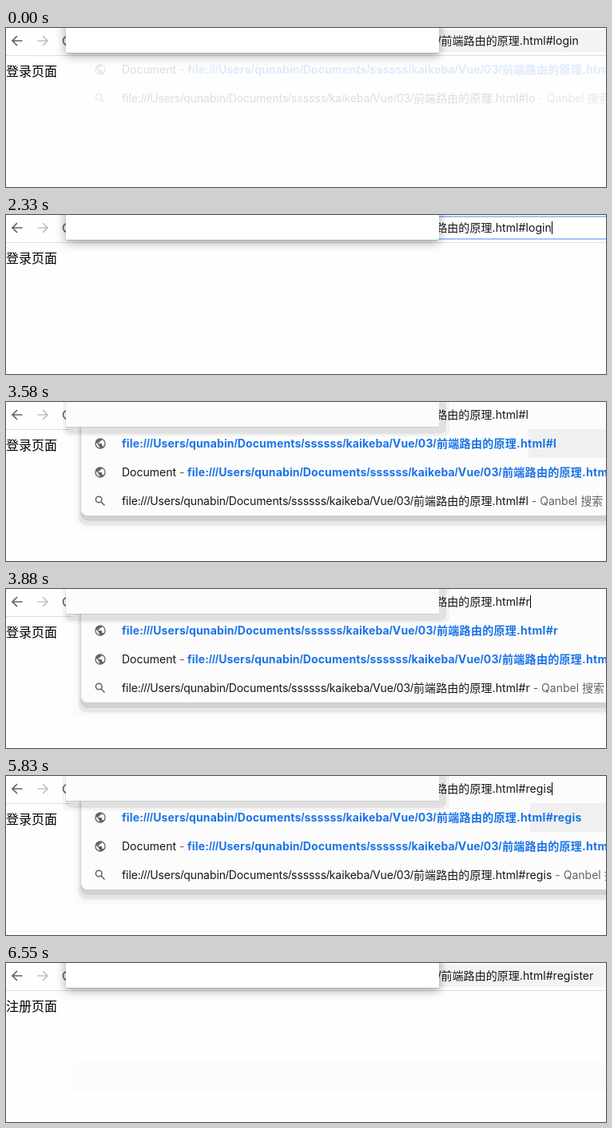
Write an HTML page with a canvas that moves like this. It is 751 by 199 pixels and loops after 8.18 s.

```html
<!DOCTYPE html>
<html lang="zh">
<head>
<meta charset="utf-8">
<title>前端路由的原理</title>
<style>
  html, body { margin: 0; width: 100%; height: 100%; overflow: hidden; background: #fefefe; }
  canvas { display: block; }
</style>
</head>
<body>
<canvas id="stage" width="751" height="199"></canvas>
<script>
const ctx = document.getElementById('stage').getContext('2d');
const LOOP = 8180;
const INK = '#151618', GRAY = '#5f6368', BLUE = '#1a73e8';
const FOLDER = 'file:///Users/qunabin/Documents/ssssss/kaikeba/Vue/03/';
const PAGE = '前端路由的原理.html#';
const ENGINE = 'Qanbel';
const GLOBE = new Path2D(`M12 2a10 10 0 1 0 0 20a10 10 0 1 0 0 -20z
  M11 19.9C7 19.4 4 16 4 12q0 -.9 .2 -1.8L9 15v1q0 2 2 2z
  M17.9 17.4Q17.4 16 16 16h-1v-3q0 -1 -1 -1H8v-2h2q1 0 1 -1V7h2q2 0 2 -2v-.4C18 5.8 20 8.7 20 12q0 3 -2.1 5.4z`);

// Each state holds from its time on and inherits what it does not set.
const steps = [
  { at: 0, hash: 'login', page: '登录页面', mode: 'rest', popup: 0.14 },
  { at: 50, popup: 0 },
  { at: 1610, mode: 'focus', ring: '#aecdfa', caret: true },
  { at: 1670, ring: '#a0c6fa' },
  { at: 2330, mode: 'edit' },
  { at: 2690, hash: 'logi', ring: null, popup: 0.5 },
  { at: 2750, popup: 1 },
  { at: 2810, hash: 'log' },
  { at: 2930, hash: 'lo' },
  { at: 3100, hash: 'l', highlight: 654 },
  { at: 3580, caret: false },
  { at: 3640, hash: '', caret: true, highlight: 0 },
  { at: 3880, hash: 'r' },
  { at: 3990, hash: 're', highlight: 656 },
  { at: 4410, hash: 'reg' },
  { at: 4530, hash: 'regi' },
  { at: 5000, caret: false },
  { at: 5480, caret: true },
  { at: 5830, hash: 'regis' },
  { at: 6130, hash: 'regist' },
  { at: 6230, hash: 'registe' },
  { at: 6340, hash: 'register' },
  { at: 6490, mode: 'rest', page: '注册页面', caret: false, highlight: 0, popup: 0.14, residue: true },
  { at: 6550, popup: 0 }
];

const stateAt = time => Object.assign({}, ...steps.filter(step => step.at <= time));

// Draws mixed Latin and Chinese text and returns the x where it ends.
function write(text, x, y, { color = INK, weight = 400, size = 14, tracking = 0 } = {}) {
  ctx.fillStyle = color;
  ctx.letterSpacing = tracking + 'px';
  for (const run of text.match(/[\u4e00-\u9fff]+|\/+|[^\/\u4e00-\u9fff]+/g)) {
    const family = /[\u4e00-\u9fff]/.test(run) ? '"Noto Sans CJK SC", "Noto Sans CJK"'
      : run[0] === '/' ? '"Liberation Sans"' : 'Inter';
    ctx.font = `${weight} ${size}px ${family}, sans-serif`;
    ctx.fillText(run, x, y);
    x += ctx.measureText(run).width;
  }
  ctx.letterSpacing = '0px';
  return x;
}

function writeAddress(x, y, hash, bold) {
  const style = bold ? { color: BLUE, weight: 700 } : {};
  write(FOLDER, x, y, { ...style, tracking: bold ? 0.15 : -0.08 });
  return write(PAGE + hash, x + (bold ? 394 : 365), y, { ...style, tracking: bold ? 0.3 : 0.08 });
}

function rect(x, y, w, h, color) {
  ctx.fillStyle = color;
  ctx.fillRect(x, y, w, h);
}

function panel(left, right, bottom, radius, color) {
  ctx.fillStyle = color;
  ctx.beginPath();
  ctx.roundRect(left, -20, right - left, bottom + 20, radius);
  ctx.fill();
}

function stroke(path, color, width) {
  ctx.strokeStyle = color;
  ctx.lineWidth = width;
  ctx.stroke(new Path2D(path));
}

function globe(y) {
  ctx.save();
  ctx.translate(118, y);
  ctx.scale(0.67, 0.67);
  ctx.translate(-12, -12);
  ctx.fillStyle = GRAY;
  ctx.fill(GLOBE, 'evenodd');
  ctx.restore();
}

const magnifier = y => stroke(`M120 ${y - 2} a3.8 3.8 0 1 0 -7.6 0 a3.8 3.8 0 1 0 7.6 0
  M119 ${y + 1} l4.5 4.5`, GRAY, 1.5);

function documentRow(y, hash) {
  globe(y);
  const x = write('Document', 145, y + 5);
  write(' - ', x, y + 5, { color: GRAY });
  writeAddress(227, y + 5, hash, true);
}

function searchRow(y, hash) {
  magnifier(y);
  const x = writeAddress(145, y + 5, hash);
  write(` - ${ENGINE} 搜索`, x, y + 5, { color: GRAY });
}

function drawPopup({ popup, hash, mode, highlight, at }) {
  if (!popup) return;
  ctx.globalAlpha = popup;
  if (mode === 'rest') {
    documentRow(52, hash);
    searchRow(88, at < 50 ? 'lo' : hash);
  } else {
    ctx.save();
    ctx.beginPath();
    ctx.rect(0, 31, 751, 168);
    ctx.clip();
    panel(84, 800, 160, 4, '#fbfbfb');
    panel(89, 800, 156, 12, '#f2f3f3');
    panel(91, 800, 154, 11, '#e4e5e5');
    panel(93, 800, 149, 10, '#d0d1d1');
    panel(94, 800, 142, 8, '#fcfcfc');
    ctx.restore();
    if (highlight) rect(highlight, 34, 751 - highlight, 36, '#f0f0f0');
    globe(52);
    writeAddress(145, 57, hash, true);
    documentRow(88, hash);
    searchRow(124, hash);
  }
  ctx.globalAlpha = 1;
}

function drawToolbar({ mode, hash, ring, caret }) {
  stroke('M20.5 16 H8.5 M14 10 L8 16 L14 22', GRAY, 1.7);
  stroke('M39.5 16 H51.5 M46 10 L52 16 L46 22', '#bdc1c6', 1.7);
  stroke('M77 10.5 a5.5 5.5 0 0 0 0 11', GRAY, 1.7);

  if (mode === 'rest') rect(500, 2, 251, 28, '#f1f3f4');
  else rect(500, 1, 251, 30, ring ? '#fff' : '#fcfcfc');
  if (ring && mode !== 'rest') {
    rect(500, 1, 251, 2, ring);
    rect(500, 29, 251, 2, ring);
  }
}

function drawAddress({ mode, hash, caret }) {
  let end;
  if (mode === 'edit') {
    end = writeAddress(145, 21, hash);
  } else {
    write('/', 540.5, 21);
    end = write(PAGE + hash, 544.5, 21, { tracking: 0.05 });
  }
  if (caret) rect(Math.round(end), 8, 1, 16, '#000');
}

function drawCover(overPopup) {
  ctx.save();
  if (overPopup) {
    panel(71, 555, 43, 8, 'rgba(0, 0, 0, .04)');
    panel(74, 551, 40, 8, 'rgba(0, 0, 0, .07)');
  } else {
    ctx.shadowColor = 'rgba(0, 0, 0, .38)';
    ctx.shadowBlur = 13;
    ctx.shadowOffsetY = 3;
  }
  panel(75, 542, 31, 2, overPopup ? '#fcfcfc' : '#fff');
  ctx.restore();
  rect(76, 31, 465, 0.6, overPopup ? '#bbb' : '#999');
}

function draw(time) {
  const state = stateAt(time);
  rect(0, 0, 751, 199, '#fefefe');
  rect(0, 34, 751, 1, '#dcdddf');
  if (state.residue) rect(84, 124, 667, 36, '#fbfbfb');
  write(state.page, 0, 60, { color: '#000', size: 16 });
  drawPopup(state);
  drawToolbar(state);
  drawAddress(state);
  drawCover(state.mode === 'edit' && state.popup > 0);
}

function tick() {
  draw(performance.now() % LOOP);
  requestAnimationFrame(tick);
}
tick();
</script>
</body>
</html>
```
